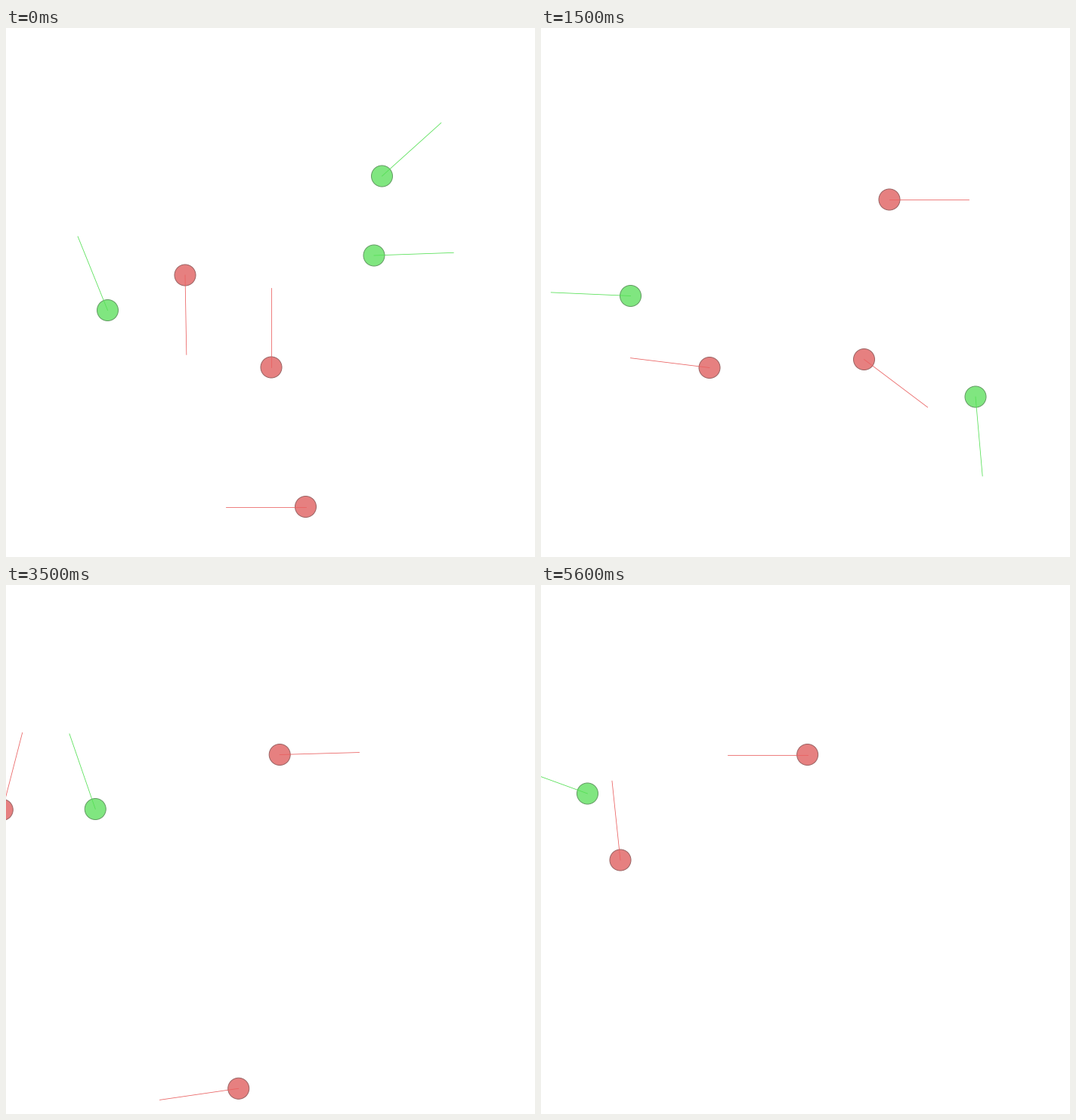
Animation, 700 px wide and 700 px high, one loop 5700 ms. Source, as a matplotlib script:

```python
import numpy as np
import matplotlib.pyplot as plt
from matplotlib.animation import FuncAnimation
from matplotlib.patches import Circle

SIZE, DPI = 700, 100
FRAMES, INTERVAL = 57, 100
RADIUS, SIGHT = 14, 105.3
CRUISE = 25  # hunter speed, pixels per step
PX = 72 / DPI

RED = dict(face="#e68080", edge="#9c6464", line="#ea6060")
GREEN = dict(face="#80e680", edge="#649c64", line="#54e054")

# Every agent passes its next key pose (x, y, heading in degrees) on these steps.
BEATS = (0, 8, 15, 22, 29, 41, 50, 56)

EAST_HUNTER = [(237, 327, -89), (353.5, 284.5, 85), (461, 227, 0),
               (467, 223.5, 192), (390.5, 228, 181)]
SOUTH_HUNTER = [(351, 449, 90), (320, 360, 345), (427.5, 438.5, 323),
                (516.5, 544, 286), (456.5, 647.5, 196), (156, 665, 180.5),
                (-69, 666, 180)]
WEST_HUNTER = [(396.5, 633.5, 180), (357, 506, 102), (223, 449.5, 173),
               (71, 406, 125), (34.5, 344.5, 139), (86, 284, 12),
               (122, 466, -85), (105, 364, -264)]
NORTH_PREY = [(497.5, 196, 42), (490, 208.5, -158), (545, 212, -550)]
EAST_PREY = [(487, 301, 2), (542, 380, -65), (575, 488, -85), (582, 611, -88)]
WEST_PREY = [(134.5, 373.5, 112), (154, 360.5, 51), (118.5, 354.5, 177.5),
             (130, 353, 341), (121, 311, 463), (114, 282.5, 475),
             (88, 279, 469), (61.5, 276, 520)]


def unit(deg):
    a = np.radians(deg)
    return np.array([np.cos(a), -np.sin(a)])


def follow(poses, t, speed=None):
    """Hermite path along the headings; without a speed it takes its time."""
    i = min(np.searchsorted(BEATS, t, side="right"), len(poses) - 1)
    t0, t1 = BEATS[i - 1], BEATS[i]
    if t > t1:
        return None
    (*p0, a0), (*p1, a1) = poses[i - 1], poses[i]
    p0, p1 = np.array(p0), np.array(p1)
    u = (t - t0) / (t1 - t0)
    reach = speed * (t1 - t0) if speed else np.hypot(*(p1 - p0))
    s = u * u * (3 - 2 * u)
    bend = u * (1 - u) ** 2 * unit(a0) - u * u * (1 - u) * unit(a1)
    return p0 + (p1 - p0) * s + reach * bend, a0 + (a1 - a0) * u


def hunter(poses):
    return lambda t: follow(poses, t, CRUISE)


def prey(poses, caught=FRAMES):
    return lambda t: follow(poses, t) if t < caught else None


def restless(poses, settle=29, flip=32):
    """Hunts, coasts to a stop, then turns about on every step."""
    def path(t):
        if t <= settle:
            return follow(poses, t, CRUISE)
        right = t > flip and t % 2
        x = 355 + 38 * np.exp((settle - t) / 2.9) + (2.4 if right else -2.4)
        return np.array([x, 224.5]), 1.6 if right else 180
    return path


class Agent:
    def __init__(self, ax, path, look, z):
        self.path = path
        self.disc = Circle((0, 0), RADIUS, fc=look["face"], ec=look["edge"],
                           lw=PX, zorder=z)
        ax.add_patch(self.disc)
        self.ray, = ax.plot([], [], color=look["line"], lw=0.8 * PX, zorder=5)

    def update(self, t):
        state = self.path(t)
        for part in (self.disc, self.ray):
            part.set_visible(state is not None)
        if state is not None:
            pos, heading = state
            self.disc.center = pos
            self.ray.set_data(*zip(pos, pos + SIGHT * unit(heading)))
        return self.disc, self.ray


fig = plt.figure(figsize=(SIZE / DPI, SIZE / DPI), dpi=DPI, facecolor="white")
ax = fig.add_axes([0, 0, 1, 1])
ax.set_xlim(0, SIZE)
ax.set_ylim(SIZE, 0)
ax.set_autoscale_on(False)
ax.axis("off")

hunters = [restless(EAST_HUNTER), hunter(SOUTH_HUNTER), hunter(WEST_HUNTER)]
preys = [prey(NORTH_PREY, 12), prey(EAST_PREY, 22), prey(WEST_PREY)]
agents = [Agent(ax, p, RED, 1) for p in hunters]
agents += [Agent(ax, p, GREEN, 2) for p in preys]


def draw(t):
    return [part for agent in agents for part in agent.update(t)]


anim = FuncAnimation(fig, draw, frames=FRAMES, interval=INTERVAL,
                     repeat=True, repeat_delay=0)
plt.show()
```
